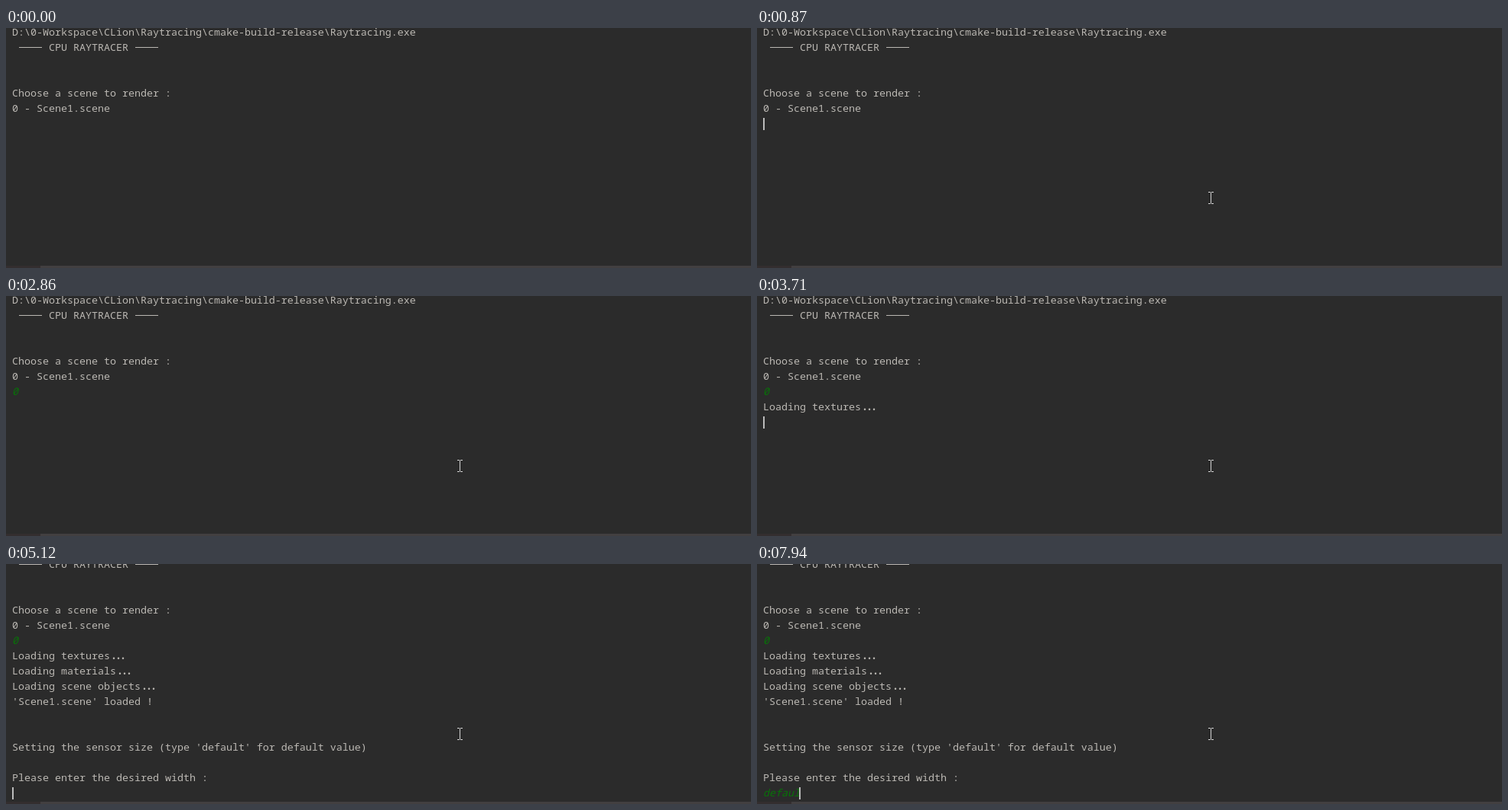
An HTML page for the animation above (8 s loop, 974 by 315 pixels).

```html
<!DOCTYPE html>
<html lang="en">
<meta charset="utf-8">
<title>Console</title>
<style>
html, body { margin: 0; width: 100%; height: 100%; overflow: hidden; background: #2b2b2b; }
#stage { position: relative; width: 974px; height: 315px; overflow: hidden; }
#log { position: absolute; left: 8px; margin: 0; color: #bbb8b3;
  font: 500 13.333px/20px "Noto Sans Mono", monospace; font-variant-ligatures: none; }
i { color: #087208; font-weight: 400; }
.dots { margin-left: 1px; letter-spacing: -2px; font-weight: 700; }
.rule { display: inline-block; width: 30px; height: 1px; margin: 0 1px; vertical-align: 4px; background: #bbb8b3; }
#caret { position: absolute; width: 2px; height: 16px; background: #bbb; }
#mouse { position: absolute; }
#bar { position: absolute; top: 312px; width: 100%; height: 3px;
  background: linear-gradient(90deg, #332e2f 45px, #423f40 45px); }
</style>
<div id="stage">
  <pre id="log"></pre>
  <div id="caret"></div>
  <div id="bar"></div>
  <svg id="mouse" width="7" height="16" fill="none" stroke="#d4d4d4">
    <path d="M0 .5H3M4 .5H7M3.5 1V15M0 15.5H3M4 15.5H7"/>
  </svg>
</div>
<script>
const LOOP = 8000, CELL = 8, ROW = 20;
const CLICK = 730, CHOOSE = 1870, ENTER = 3450, LOAD = 3710, READY = 5120, TYPE = 6960;
const $ = id => document.getElementById(id);
const log = $('log'), caret = $('caret'), mouse = $('mouse');
const rule = '<span class="rule"></span>';
const loading = what => `Loading ${what}<span class="dots">...</span>`;
const typedText = s => `<i>${s}</i>`;

const intro = [
  'D:\\0-Workspace\\CLion\\Raytracing\\cmake-build-release\\Raytracing.exe',
  ` ${rule} CPU RAYTRACER ${rule}`, '', '',
  'Choose a scene to render :', '0 - Scene1.scene'
];
const loaded = [
  loading('textures'), loading('materials'), loading('scene objects'),
  "'Scene1.scene' loaded !", '', '',
  "Setting the sensor size (type 'default' for default value)", '',
  'Please enter the desired width :'
];

const within = (t, from, to) => t >= from && t < to;
// How many of n steps, one every gap ms, have happened since start
const steps = (t, start, gap, n) =>
  Math.max(0, Math.min(n, Math.floor((t - start) / gap) + 1));

function caretVisible(t) {
  const blinkedOff = within(t, 2860, 6500) && (t - 2860) % 1495 < 495;
  const beforeKey = within(t, CHOOSE - 70, CHOOSE) || within(t, TYPE - 120, TYPE);
  return t >= CLICK && !blinkedOff && !beforeKey;
}

function place(el, x, y) {
  el.style.left = x + 'px';
  el.style.top = y + 'px';
}

let shown = '';
function draw(now) {
  const t = now % LOOP;
  const lines = [...intro];
  if (t >= ENTER) lines.push(typedText('0'));
  if (t >= LOAD) lines.push(...loaded.slice(0, t < READY ? 1 : loaded.length));
  const input = within(t, CHOOSE, ENTER) ? '0' : 'default'.slice(0, steps(t, TYPE, 196, 6));
  const html = [...lines, typedText(input)].join('\n');
  if (html !== shown) log.innerHTML = shown = html;

  const top = t < READY ? -5 : -30;
  log.style.top = top + 'px';
  caret.hidden = !caretVisible(t);
  place(caret, 8 + input.length * CELL - (input ? 1 : 0), top + lines.length * ROW + 3);

  // The pointer enters from the lower right, rests, then glides to its place
  const enter = steps(t, 260, 65, 3), glide = steps(t, 590, 70, 5) / 5;
  const ease = 1 - (1 - glide) ** 2;
  mouse.style.display = enter ? '' : 'none';
  place(mouse, Math.round(894 - 78 * enter - 70 * ease), Math.round(330 - 34 * enter - 13 * ease));
  requestAnimationFrame(draw);
}
requestAnimationFrame(draw);
</script>
</html>
```
